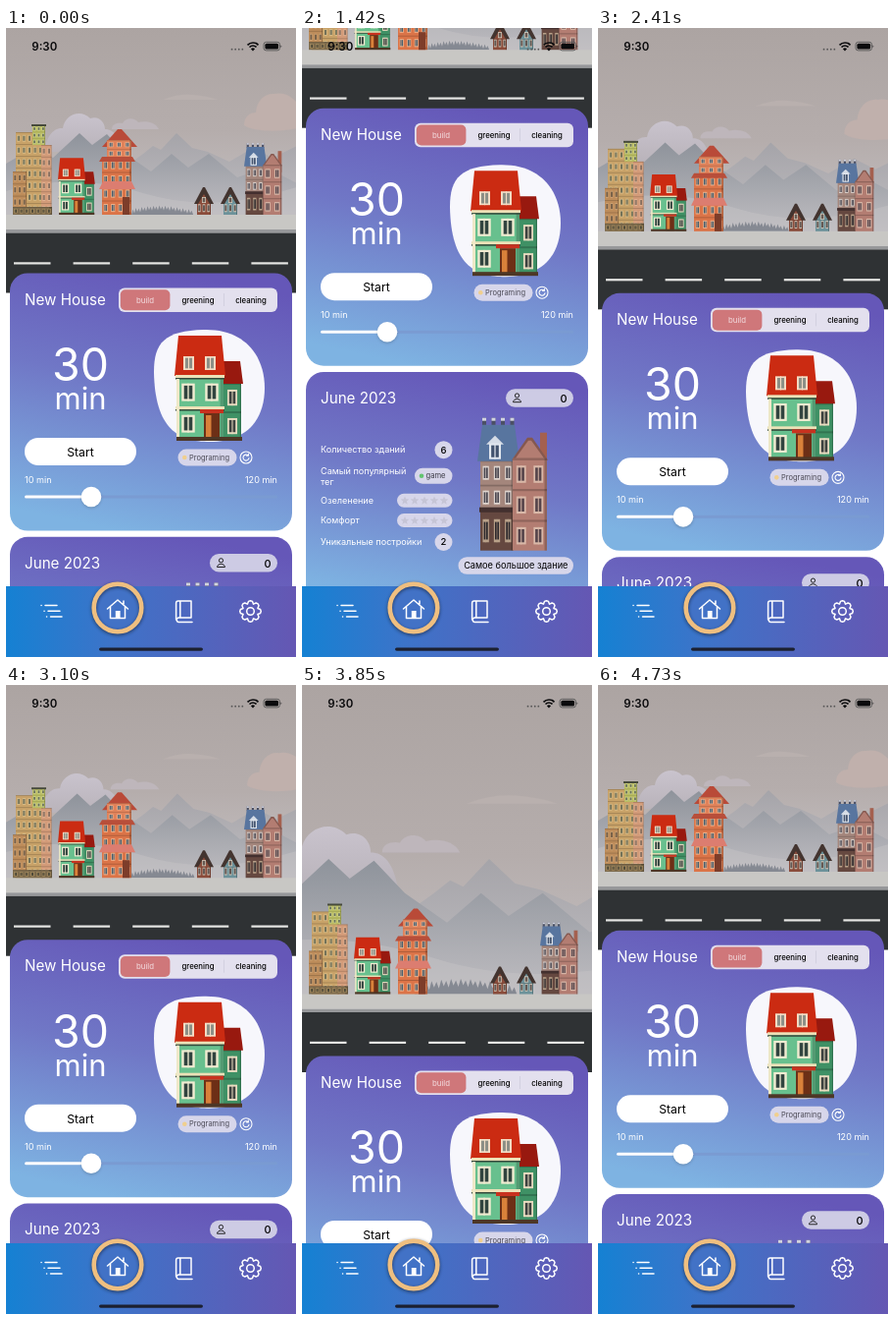
An HTML page that plays this animation: 296 px wide and 640 px high, repeating every 4830 ms.

```html
<!DOCTYPE html>
<html lang="en">
<head>
<meta charset="utf-8">
<title>House timer</title>
<style>
html,body{margin:0;width:100%;height:100%;overflow:hidden;background:#fff}
svg{display:block;width:100vw;height:100vh;font-family:Inter,"Noto Sans",sans-serif}
.w{fill:#fff}
.line{fill:none;stroke:#fff;stroke-width:1.5;stroke-linecap:round;stroke-linejoin:round}
.thin{stroke-width:1.1}
.mid{text-anchor:middle}
.end{text-anchor:end}
.chip{fill:#d7d6ea}
.s{font-size:9.1px}
.title{font-size:15.2px;fill:#fff}
</style>
</head>
<body>
<svg viewBox="0 0 296 640" xmlns="http://www.w3.org/2000/svg">
<defs>
  <linearGradient id="sky" x2="0" y2="1"><stop stop-color="#aca4a2"/><stop offset=".55" stop-color="#b5adac"/><stop offset="1" stop-color="#c6c2c4"/></linearGradient>
  <linearGradient id="far" x2="0" y2="1"><stop stop-color="#a5a4a9"/><stop offset="1" stop-color="#c2bfc2"/></linearGradient>
  <linearGradient id="near" x2="0" y2="1"><stop stop-color="#8e939b"/><stop offset="1" stop-color="#bfbdc1"/></linearGradient>
  <linearGradient id="cloud" x2="0" y2="1"><stop stop-color="#c9c3cd"/><stop offset="1" stop-color="#b9b3ba"/></linearGradient>
  <linearGradient id="card" x1=".62" y1="0" x2=".38" y2="1"><stop stop-color="#6557b8"/><stop offset=".45" stop-color="#7077c6"/><stop offset="1" stop-color="#7eb3e2"/></linearGradient>
  <linearGradient id="bar"><stop stop-color="#1581d3"/><stop offset=".35" stop-color="#3c74c9"/><stop offset="1" stop-color="#6557b3"/></linearGradient>
  <filter id="soft" x="-50%" y="-50%" width="200%" height="200%"><feGaussianBlur stdDeviation="1.6"/></filter>
</defs>

<g id="scene">
  <rect y="-1" width="296" height="193" fill="url(#sky)"/>
  <path fill="url(#cloud)" d="M40 126C40 112 48 101 58 102C60 88 76 82 86 92C95 89 101 96 101 103C109 103 115 109 118 126Z"/>
  <path fill="#beb6bb" d="M108 103C108 97 115 96 119 97C122 91 131 91 135 96C143 94 153 96 156 103Z"/>
  <path fill="#c0b0ac" d="M243 99C243 90 249 86 255 86C256 74 264 66 274 67C283 65 291 69 297 76V102C280 106 254 106 243 99Z"/>
  <path fill="#b9b0ae" d="M160 73Q175 67 190 68T216 73Z"/>
  <path fill="url(#far)" d="M112 191V148L140 128L150 120L158 124L174 107L190 122L206 126L228 136L252 122L272 132L297 120V191Z"/>
  <path fill="url(#near)" d="M0 191V138L24 124L48 132L75 107L88 119L103 108L122 128L148 146L169 128L186 142L207 128L236 152L266 142L297 158V191Z"/>
  <path fill="#c6c3c6" opacity=".5" d="M0 166Q70 146 140 168T297 162V191H0Z"/>
  <path id="trees" fill="#858992"/>
</g>

<g id="street"></g>

<g id="cards">
  <rect x="4" y="249.5" width="288" height="262" rx="18" fill="url(#card)"/>
  <text x="19" y="281.5" class="title">New House</text>
  <rect x="115" y="264.5" width="162" height="24.5" rx="6" fill="#e3e0ee"/>
  <rect x="116.8" y="266.3" width="50.6" height="21" rx="5" fill="#cf777a"/>
  <path d="M222.5 270v13" stroke="#cfccdc" stroke-width=".8"/>
  <g font-size="7.8" class="mid" font-weight="500">
    <text x="142" y="279.6" fill="#f3dde0" font-weight="400">build</text><text x="196" y="279.6">greening</text><text x="250" y="279.6">cleaning</text>
  </g>
  <text x="76" y="359" class="w mid" font-size="46.4">30</text>
  <text x="76" y="388" class="w mid" font-size="31">min</text>
  <rect x="19" y="417" width="114" height="28" rx="14" class="w"/>
  <text x="76" y="435.8" class="mid" font-size="12.2">Start</text>
  <text x="19" y="463" class="w s">10 min</text>
  <text x="277" y="463" class="w s end">120 min</text>
  <rect x="19" y="475.5" width="258" height="3" rx="1.5" fill="#7a9bd2"/>
  <rect x="19" y="475.5" width="68" height="3" rx="1.5" class="w"/>
  <circle cx="87" cy="478.5" r="10" fill="#345" opacity=".3" filter="url(#soft)"/>
  <circle cx="87" cy="477" r="10.3" class="w"/>
  <path fill="#f7f7fc" d="M151 350C151 320 162 308 202 307C244 306 264 334 264 366C264 404 240 421 208 421C176 421 152 408 151 350Z"/>
  <g id="home"></g>
  <rect x="175.5" y="428.5" width="60" height="17" rx="8.5" class="chip"/>
  <circle cx="182.3" cy="437" r="2.3" fill="#f0cf8e"/>
  <text x="187" y="439.7" font-size="7.5" fill="#4c4a56">Programing</text>
  <circle cx="245" cy="437" r="6" class="line thin"/>
  <path class="line thin" d="M247 434.8A3 3 0 1 0 248 437.5M247.4 433.4V435.2H245.6"/>

  <g transform="translate(0 197.5)">
    <rect x="4" y="320.3" width="288" height="235.7" rx="18" fill="url(#card)"/>
    <text x="19" y="352" class="title">June 2023</text>
    <rect x="208" y="337.5" width="69" height="18.5" rx="9.25" fill="#cdcbe4"/>
    <circle cx="219.5" cy="344.3" r="2.1" fill="none" stroke="#222"/>
    <path d="M215.5 351C215.7 346.9 223.3 346.9 223.5 351Z" fill="none" stroke="#222"/>
    <text x="270.5" y="351" class="end" font-size="11" font-weight="500">0</text>
    <g id="pair"></g>
    <g class="w s">
      <text x="19" y="402.5">Количество зданий</text>
      <text x="19" y="424">Самый популярный</text><text x="19" y="435.3">тег</text>
      <text x="19" y="454">Озеленение</text>
      <text x="19" y="474.3">Комфорт</text>
      <text x="19" y="496.5">Уникальные постройки</text>
    </g>
    <g class="chip">
      <circle cx="144.5" cy="399.5" r="9"/><circle cx="144.5" cy="493.3" r="9"/>
      <rect x="115" y="418" width="38.5" height="16" rx="8"/>
      <rect x="97" y="444" width="56.5" height="14" rx="7"/><rect x="97" y="464.3" width="56.5" height="14" rx="7"/>
      <rect x="159.5" y="508.5" width="117.5" height="17.5" rx="8.75"/>
    </g>
    <path id="stars" fill="#c6c5d6"/>
    <g class="mid" font-size="9.5" font-weight="500"><text x="144.5" y="403">6</text><text x="144.5" y="496.8">2</text></g>
    <circle cx="122" cy="426" r="2.3" fill="#62c370"/>
    <text x="126.5" y="428.8" font-size="7.6" fill="#3c3b46">game</text>
    <text x="218.3" y="520.5" class="mid" font-size="9.2">Самое большое здание</text>
  </g>
</g>

<g>
  <rect y="568" width="296" height="72" fill="url(#bar)"/>
  <circle cx="114" cy="590" r="24" fill="#4272c6"/>
  <circle cx="114" cy="591.3" r="24.3" fill="none" stroke="#122036" stroke-width="6" opacity=".5" filter="url(#soft)"/>
  <circle cx="114" cy="590" r="24.3" fill="none" stroke="#efbf80" stroke-width="4.6"/>
  <path class="line" d="M103.5 591L114 582L124.5 591M106.5 589V600.5H121.5V589M120 586V583"/>
  <rect x="111.8" y="593" width="4.8" height="7.5" class="w"/>
  <path class="line" d="M40 587.5H52M43 593.3H55M45.5 599H57M36 587.5h.1M39 593.3h.1M41.5 599h.1"/>
  <path class="line" d="M176 583H189V600H176A2.3 2.3 0 0 0 176 604.500H190M173.600 602V585A2 2 0 0 1 176 583M177.800 583V600"/>
  <path id="gear" class="line"/>
  <circle cx="249.5" cy="593.5" r="3.8" class="line"/>
  <rect x="95" y="630.4" width="106" height="3.4" rx="1.7" fill="#1c2030"/>
</g>

<g fill="#0b0b0d">
  <text x="26.3" y="23" font-size="11.5" font-weight="600">9:30</text>
  <path fill="none" stroke="#555" stroke-width="1.7" stroke-linecap="round" stroke-dasharray=".1 3.5" d="M230.5 21.7H242"/>
  <path d="M252 23.5L249.9 21.2A3 3 0 0 1 254.1 21.2Z"/>
  <path fill="none" stroke="#0b0b0d" stroke-width="1.7" d="M248.5 19.5A5 5 0 0 1 255.5 19.5M246.5 17.3A7.7 7.7 0 0 1 257.5 17.3"/>
  <rect x="263" y="14.3" width="16.5" height="8.6" rx="2.6" fill="none" stroke="#555" stroke-width=".9"/>
  <rect x="264.4" y="15.7" width="13.7" height="5.8" rx="1.5"/>
  <path d="M280.6 17.2Q282 18.6 280.6 20Z"/>
</g>
</svg>
<script>
const el = id => document.getElementById(id);
const many = (n, f) => Array.from({length: n}, (_, i) => f(i)).join('');
const box = (x, y, w, h, c) => `<rect x="${x}" y="${y}" width="${w}" height="${h}" fill="${c}"/>`;
const roof = (x, y, w, h, inset, c) =>
  `<path fill="${c}" d="M${x} ${y + h}L${x + inset} ${y}H${x + w - inset}L${x + w} ${y + h}Z"/>`;
const pane = (x, y, w, h, frame, glass) =>
  box(x, y, w, h, frame) + box(x + w * .18, y + h * .12, w * .64, h * .76, glass) + box(x + w * .45, y, w * .1, h, frame);

// wall with evenly spaced windows, a ledge under each floor and a shaded right edge
function wall(x, y, w, h, c, cols, rows, frame = '#e8dcc0', glass = '#3e4240') {
  const dx = w / cols, dy = h / rows;
  return box(x, y, w, h, c) + box(x + w * .93, y, w * .07, h, '#0003') +
    many(rows, r => box(x, y + r * dy, w, dy * .07, '#0003') +
      many(cols, i => pane(x + (i + .22) * dx, y + (r + .24) * dy, dx * .56, dy * .56, frame, glass)));
}

// art with its foot at (x, 190), scaled down
const shrink = (art, left, foot, x, k) =>
  `<g transform="translate(${x - left * k} ${190 - foot * k}) scale(${k})">${art}</g>`;

const greenHouse =
  wall(222, 361, 18, 58, '#3f9165', 1, 2) + roof(219, 339, 23, 23, 3, '#98190f') +
  wall(174, 354, 48, 64, '#68c08e', 2, 2, '#f1ecd2', '#31443f') + roof(172, 313, 52, 41, 4, '#cb2b12') +
  many(2, i => pane(181 + i * 22, 334, 11, 14, '#f3dcc4', '#8c8f86')) +
  many(2, i => box(173, 353 + i * 32, 50, 3, '#ece2b8') + box(173, 356 + i * 32, 50, 1.5, '#35493b')) +
  box(174, 357, 3, 60, '#efe8c8') + box(202, 392, 16, 27, '#6d2f16') + box(204, 394, 5.5, 23, '#d9813a') +
  box(198, 388, 24, 4, '#c8321f') + box(174, 416, 67, 4, '#4d3726');

const blueHouse =
  many(4, i => box(184 + i * 9.5, 367, 4, 9, '#4b5064') + box(184 + i * 9.5, 367, 4, 3, '#d2d4e0')) +
  wall(182, 410, 34, 50, '#a4867c', 3, 2, '#ded5cf', '#4a4750') +
  wall(182, 460, 34, 42, '#654840', 3, 1, '#b9a189', '#2c282c') + box(181, 458, 36, 5, '#43302f') +
  roof(179, 374, 43, 37, 5, '#58759f') + roof(188, 385, 18, 9, 9, '#d5dce6') + pane(191, 393, 12, 16, '#e3e8ef', '#42526d');
const brickHouse =
  box(243, 382, 7, 40, '#a4604f') + roof(214, 387, 37, 23, 16, '#85584f') + roof(218, 390, 29, 18, 13, '#b37d72') +
  wall(215, 408, 35, 94, '#b37d72', 2, 3, '#d9b8a8', '#55444a');
const pair = blueHouse + brickHouse;

const tenement =
  wall(10, 106, 28, 84, '#c8a268', 5, 7, '#dcc08c', '#5f6450') + wall(36, 119, 10.5, 71, '#d39b79', 2, 6, '#e5b797', '#735f54') +
  wall(27, 99, 13, 20, '#b9bd62', 3, 3, '#dfe0a8', '#3d4a3c') + wall(7, 146, 14, 37, '#bd8c5a', 3, 3, '#d3a878', '#57493a') +
  wall(7, 182, 40, 8, '#7c6a4c', 7, 1, '#b89a66', '#3c3b32') + box(26, 98, 15, 2, '#474b3c');

const chalet =
  wall(98, 132, 30, 58, '#db7448', 4, 4, '#efb28c', '#48606f') + roof(98, 103, 36, 18, 16, '#b94a38') +
  wall(103, 114, 25, 18, '#e0825a', 3, 2, '#efb28c', '#4a6678') +
  roof(95, 131, 37, 5, 3, '#b84e3a') + roof(95, 156, 37, 8, 4, '#dc7d70') + box(119, 172, 7, 18, '#7d3d2a');

const cabin = (x, c) => wall(x + 3, 176, 14, 14, c, 3, 1, '#d5cabb', '#3a3030') +
  roof(x, 162, 20, 17, 9, '#43342f') + roof(x + 4, 169, 12, 10, 6, c) + pane(x + 8, 172, 4, 6, '#ddd2c2', '#4a3c38');

// points alternating between radii, around a centre
function ring(cx, cy, radii, n) {
  let d = '';
  for (let i = 0; i < n; i++) {
    const a = i * 2 * Math.PI / n - Math.PI / 2, r = radii[i % radii.length];
    d += (i ? 'L' : 'M') + (cx + r * Math.cos(a)).toFixed(2) + ' ' + (cy + r * Math.sin(a)).toFixed(2);
  }
  return d + 'Z';
}

el('street').innerHTML =
  box(0, 190, 296, 15, '#c8c7c4') + box(0, 205, 296, 3.5, '#97989a') + box(0, 208.5, 296, 61, '#2f3234') +
  many(5, i => box(8 + i * 60.6, 238.3, 37.5, 2.2, '#e6e6e4')) +
  tenement + shrink(greenHouse, 172, 420, 53, .54) + chalet + cabin(192, '#8a4c3b') + cabin(219, '#6c929a') +
  shrink(pair, 179, 502, 243, .54);
el('home').innerHTML = greenHouse;
el('pair').innerHTML = pair;
el('gear').setAttribute('d', ring(249.5, 593.5, [10.8, 10.3, 8, 10.3], 32));
el('stars').setAttribute('d', many(10, i => ring(105 + i % 5 * 10, i < 5 ? 451.3 : 471.6, [4.6, 2], 10)));
el('trees').setAttribute('d', 'M128 190' + many(21, i => {
  const x = 128 + i * 3, top = 184.5 - 3 * Math.sin(i * .18) - i % 2;
  return `L${x + 1.5} ${top}L${x + 3} ${top + 4}`;
}) + 'V190Z');

const LOOP = 4830, TICK = 110;
// While the page moves, the screen refreshes in about nine even steps a second.
const moves = [[0, 0], [1100, 1620], [1840, 2870], [3100, 3850], [4200, 4730]];

function snap(t) {
  const [a, b] = moves.findLast(m => m[0] <= t);
  const step = (b - a) / Math.round((b - a) / TICK) || 1;
  return Math.min(b, a + Math.floor((t - a) / step + .08) * step);
}

const outSine = p => Math.sin(p * Math.PI / 2);
const inOutSine = p => (1 - Math.cos(p * Math.PI)) / 2;
const outCubic = p => 1 - (1 - p) ** 3;
const spring = ms => (1 + ms * .0143) * Math.exp(-ms * .0143);
const tween = (t, a, b, from, to, ease) => from + (to - from) * ease(Math.min(1, Math.max(0, (t - a) / (b - a))));

// Scroll offset of the cards; positive values are overscroll at the top.
const LOW = -197.5, FLING = 23.5, PULL = 128;
function offset(t) {
  if (t < 1820) return tween(t, 1070, 1620, 0, LOW - 5, outSine);
  if (t < 1955) return tween(t, 1820, 1955, LOW - 5, LOW, outSine);
  if (t < 2450) return tween(t, 1955, 2450, LOW, FLING, inOutSine);
  if (t < 3080) return FLING * spring(t - 2450);
  if (t < 4150) return tween(t, 3080, 3850, 0, PULL, outCubic);
  return PULL * spring(t - 4150);
}

function draw(time) {
  const o = offset(snap(time));
  const d = o > 0 ? Math.max(0, o - 3.5) : o;
  const zoom = 1 + Math.max(0, d) / 190;
  el('cards').setAttribute('transform', `translate(0 ${o})`);
  el('street').setAttribute('transform', `translate(0 ${d})`);
  el('scene').setAttribute('transform', `translate(${148 * (1 - zoom)} ${Math.min(0, d)}) scale(${zoom})`);
}

function loop() {
  draw(performance.now() % LOOP);
  requestAnimationFrame(loop);
}
loop();
</script>
</body>
</html>
```
